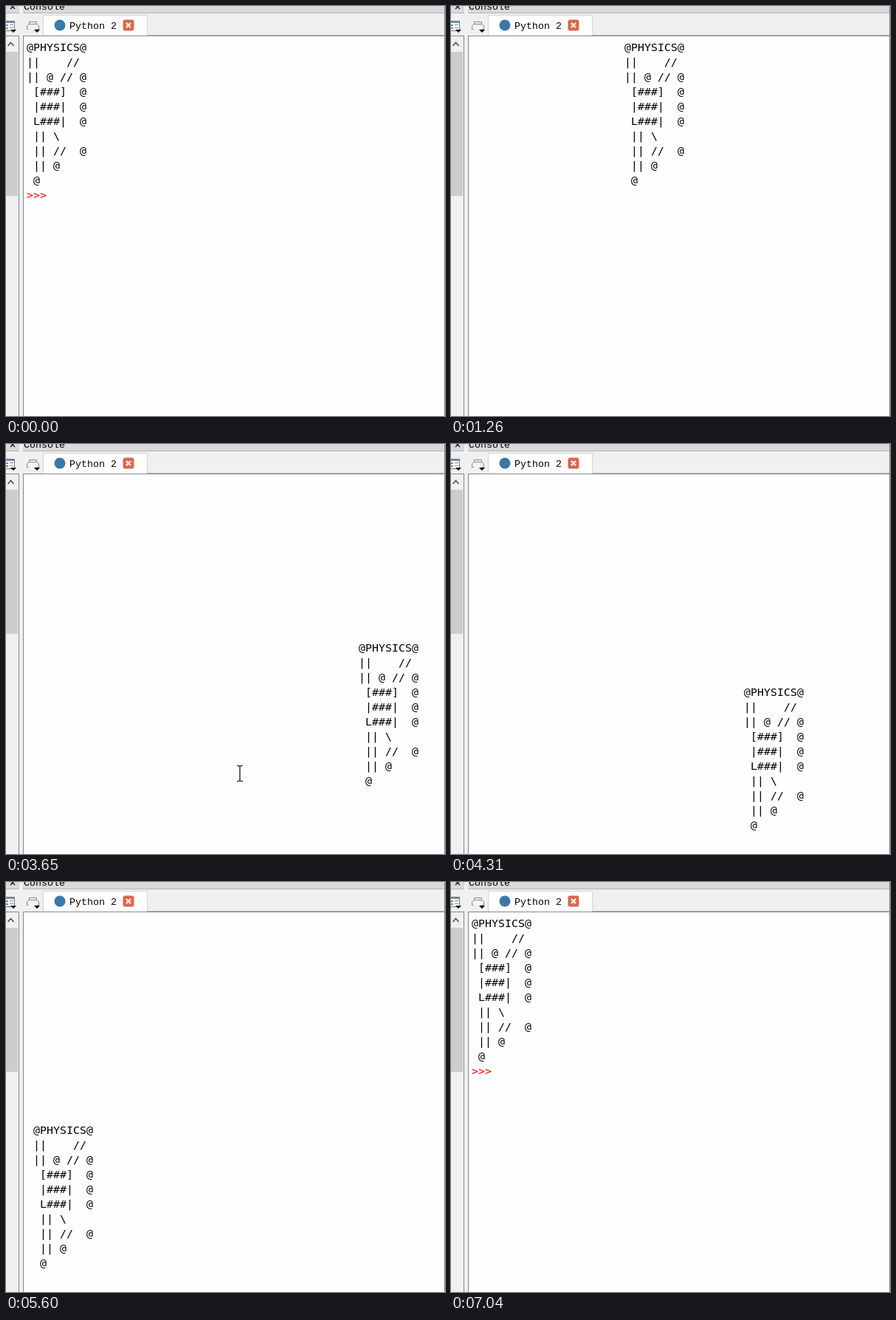
Recreate the animation shown at these times as an HTML page. Size 595 by 555 pixels, loop 7.53 s.

```html
<!DOCTYPE html>
<html lang="en">
<head>
<meta charset="utf-8">
<title>Console walk</title>
<style>
  html, body { margin: 0; width: 100%; height: 100%; overflow: hidden; background: #fff; }
  #stage { position: relative; width: 595px; height: 555px; overflow: hidden; background: #fefefe; }
  svg { position: absolute; left: 0; top: 0; }
  svg text { font: 13.33px "Liberation Mono", monospace; fill: #000; }
  pre {
    position: absolute; left: 28px; top: 46px; margin: 0;
    font: 14.95px/20px "DejaVu Sans Mono", monospace; color: #000;
  }
  #prompt { top: 246px; width: 568px; white-space: pre-wrap; word-break: break-all; }
  #prompt b { font-weight: 400; color: #f00; }
</style>
</head>
<body>
<div id="stage">
  <svg width="595" height="555" viewBox="0 0 595 555">
    <g shape-rendering="crispEdges">
      <path fill="#f0f0f0" d="M0 0H595V40H23V555H0z"/>
      <path fill="#d9d9d9" d="M0 0H18V9H0zM23 0H595V9H23z"/>
      <path fill="#b4b4b4" d="M0 9H18V10H0zM23 9H595V10H23zM192 39H595V40H192z"/>
      <path fill="#d4d4d4" d="M50 12H192V40H50z"/>
      <path fill="#fff" d="M51 13H191V40H51z"/>
      <path fill="#828790" d="M0 40H18V41H0zM17 40H18V555H17zM23 40H595V41H23zM23 40H24V555H23zM594 0H595V555H594z"/>
      <path fill="#cdcdcd" d="M0 62H16V257H0z"/>
      <path fill="#fff" stroke="#777" d="M-3.5 20.5H11.5V33.5H-3.5z"/>
      <path fill="#6f93c4" d="M0 21H11V23H0z"/>
      <path fill="#72a060" d="M0 25H3V27H0zM0 29H3V31H0z"/>
      <path fill="#888" d="M5 25H10V26H5zM5 29H10V30H5z"/>
    </g>
    <path d="M2.5 54L6.5 49.5L10.5 54" fill="none" stroke="#505050" stroke-width="1.6"/>
    <path d="M6 -2L12 4M12 -2L6 4" stroke="#222" stroke-width="1.5"/>
    <g fill="#f4f4f4" stroke="#858585">
      <path d="M31.5 25V21.5H41.5V25"/>
      <path d="M30.5 31.5H28.5V27L31 24.5H42L44.5 27V31.5H41.5"/>
    </g>
    <path d="M6 32H14L10 36zM38 32H46L42 36z"/>
    <circle cx="73" cy="26" r="7.5" fill="#3b77a8"/>
    <rect x="159" y="19" width="14" height="14" rx="2" fill="#e0694a" stroke="#c9573a" stroke-width=".8"/>
    <path d="M163 23L169 29M169 23L163 29" stroke="#fff" stroke-width="2"/>
    <text x="24" y="5">Console</text>
    <text x="86" y="31">Python 2</text>
    <path id="cursor" d="M-4 -10.5H-1.5L0 -9.5L1.5 -10.5H4M0 -9.5V9.5M-4 10.5H-1.5L0 9.5L1.5 10.5H4" fill="none" stroke="#000" stroke-width="1.2"/>
  </svg>
  <pre id="walker">
@PHYSICS@
||    //
|| @ // @
 [###]  @
 |###|  @
 L###|  @
 || \
 || //  @
 || @
 @</pre>
  <pre id="prompt"><b>&gt;&gt;&gt; </b><span id="command">runfile('D:/lessons/python/ascii/physics_walk.py', wdir=r'D:/lessons/python/ascii')</span></pre>
</div>
<script>
  const LOOP = 7530, TICK = 132, PHASE = 32, CELL = 9, LINE = 20;
  const FIRST = 4, LAST = 53;

  // Clockwise lap of the console: [tick, column, row]
  const lap = [
    [3.3, 0, 0], [9, 23, 0], [15.1, 50, 0], [16, 50, 0], [30, 50, 14],
    [37, 20, 14], [42.4, 0, 14], [43.3, 0, 14], [48, 0, 6], [LAST, 0, 0]
  ];
  // Ticks that catch the console between clearing and printing
  const cleared = [20, 21, 29, 46];

  const [walker, prompt, command, cursor] =
    ["walker", "prompt", "command", "cursor"].map(id => document.getElementById(id));

  const clamp = x => Math.min(1, Math.max(0, x));
  const mix = (a, b, p) => a + (b - a) * p;
  const show = (el, on) => { el.style.visibility = on ? "visible" : "hidden"; };
  const place = (el, x, y) => { el.style.transform = `translate(${x}px, ${y}px)`; };

  function cellAt(tick) {
    const i = Math.max(1, lap.findIndex(key => key[0] >= Math.min(tick, LAST)));
    const [t0, c0, r0] = lap[i - 1], [t1, c1, r1] = lap[i];
    const p = clamp((tick - t0) / (t1 - t0));
    return [Math.round(mix(c0, c1, p)), Math.round(mix(r0, r1, p))];
  }

  const start = performance.now();
  function draw() {
    const t = (performance.now() - start) % LOOP;
    const tick = Math.floor((t - PHASE) / TICK);

    const [col, row] = cellAt(tick);
    place(walker, col * CELL, row * LINE);
    show(walker, !cleared.includes(tick));

    const glide = 1 - (1 - clamp((tick - 21) / 6)) ** 2;
    place(cursor, mix(149, 317, glide), mix(543, 446, glide));
    show(cursor, tick >= 21 && tick < 29);

    show(prompt, tick < FIRST || tick >= LAST);
    show(command, t >= 280 && tick < FIRST);
    requestAnimationFrame(draw);
  }
  draw();
</script>
</body>
</html>
```
